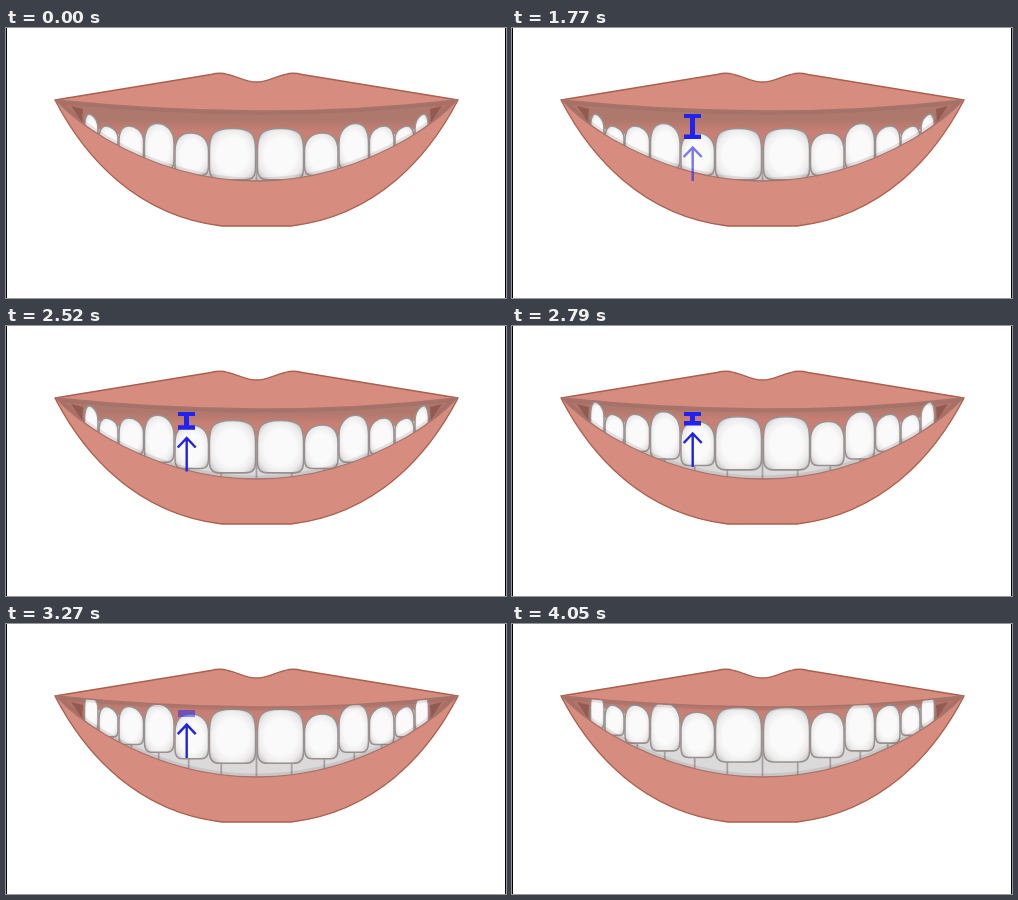
An HTML page for the animation above (6.3 s loop, 500 px wide and 270 px high).

```html
<!DOCTYPE html>
<html lang="en">
<head>
<meta charset="utf-8">
<title>Smile</title>
<style>
  html, body { margin: 0; width: 100%; height: 100%; overflow: hidden; background: #fff; }
  svg { display: block; width: 100%; height: 100%; }
</style>
</head>
<body>
<svg viewBox="0 0 500 270">
  <defs>
    <clipPath id="mouth">
      <path id="opening" d="M50 72Q150 82.5 250.5 83T451 72Q433 92 401 111C361 134 311 153 250.5 153S140 134 100 111Q68 92 50 72Z"/>
    </clipPath>
    <linearGradient id="gum" gradientUnits="userSpaceOnUse" x1="0" y1="92" x2="0" y2="104">
      <stop stop-color="#ae786d"/><stop offset="1" stop-color="#c97f74"/>
    </linearGradient>
    <radialGradient id="enamel" cx=".5" cy=".52" r=".62">
      <stop offset=".55" stop-color="#fafafa"/><stop offset=".8" stop-color="#ebebeb"/><stop offset="1" stop-color="#c8c5c5"/>
    </radialGradient>
  </defs>

  <path fill="#d78c80" stroke="#a9604f" stroke-width="1.3" stroke-linejoin="round"
    d="M49 72L205 46.5Q214 44 222 46.5C233 49 240 54 250.5 54S268 49 279 46.5Q287 44 296 46.5L452 72C423 128 371 188 285 198H216C130 188 78 128 49 72Z"/>

  <g clip-path="url(#mouth)">
    <path fill="#dadada" d="M40 60H460V160H40Z"/>
    <path id="lower" stroke="#a5a1a0" stroke-width="1.8"/>
    <g id="jaw">
      <path fill="url(#gum)" d="M40 40H461V80L431 95Q250.5 149 70 95L40 80Z"/>
      <g id="teeth" fill="url(#enamel)" stroke="#99908e" stroke-width="1.5"/>
    </g>
    <path fill="#b3746a" d="M48 70L78 78V100ZM453 70L423 78V100Z"/>
    <path fill="#7d4b41" opacity=".6" d="M65 78L77 81L76 94ZM436 78L424 81L425 94Z"/>
    <use href="#opening" fill="none" stroke="#6b5552" stroke-width="7" opacity=".15"/>
  </g>
  <use href="#opening" fill="none" stroke="#a8736a" stroke-width="1.4"/>

  <path id="gauge" fill="#2222f0"/>
  <path id="arrow" fill="none" stroke="#2222e0" stroke-width="2.4" d="M180.7 153V120M171.7 129L180.7 119.5L189.7 129"/>
  <path d="M.5 0V270M499.5 0V270" stroke="#000"/>
</svg>
<script>
const el = id => document.getElementById(id);
const ramp = (t, from, to) => Math.min(1, Math.max(0, (t - from) / (to - from)));
const ease = p => p * p * (3 - 2 * p);
const MID = 250.5;

function crown(l, r, top, i) {
  const w = r - l, d = MID - (l + r) / 2;
  const b = 152.5 - d * d / 850, h = b - top;
  const peak = l + w * (.5 - .035 * i);  // outer teeth lean outwards
  const k = w * (i ? .18 : .06), side = top + h * .42, bend = top + h * .12;
  return `M${l + w * .22} ${b}Q${l} ${b} ${l} ${b - h * .2}L${l} ${side}` +
    `C${l} ${bend} ${l + k} ${top} ${peak} ${top}S${r} ${bend} ${r} ${side}` +
    `L${r} ${b - h * .2}Q${r} ${b} ${r - w * .22} ${b}Z`;
}

// Half an arch from the centre outwards, then its mirror image
const widths = [46, 33.5, 29.5, 24.5, 19, 13.5];
const tops = [100.5, 105, 95.5, 98, 98, 86];
let right = MID - 1;
const half = widths.map((w, i) => {
  const path = `<path d="${crown(right - w, right, tops[i], i)}"/>`;
  right -= w + 1;
  return path;
}).join("");
el("teeth").innerHTML = half + `<g transform="matrix(-1 0 0 1 ${2 * MID} 0)">${half}</g>`;

let gaps = "";
for (let n = -4; n <= 4; n++) gaps += `M${MID + n * (36.5 - 1.3 * Math.abs(n))} 100v55`;
el("lower").setAttribute("d", gaps);

function draw(now) {
  const t = Math.floor(now % 6300 / 30) * 30;
  const p = ease(ramp(t, 1770, 3630));
  const stretch = 1 + .06 * p;
  el("jaw").setAttribute("transform", `translate(0 ${100 - 17 * p - 100 * stretch}) scale(1 ${stretch})`);

  const low = 111 - 20 * p;
  el("gauge").setAttribute("d",
    `M172 86H189V90H183V${low - 4.5}H189V${low}H172V${low - 4.5}H178V90H172Z`);
  el("gauge").setAttribute("opacity", ramp(t, 900, 1350) * (1 - ramp(t, 3060, 3480)));

  el("arrow").setAttribute("transform", `translate(0 ${-21 * p})`);
  el("arrow").setAttribute("opacity", ramp(t, 1500, 1950) * (1 - ramp(t, 3750, 4050)));
}

const start = performance.now();
function tick() {
  draw(performance.now() - start);
  requestAnimationFrame(tick);
}
tick();
</script>
</body>
</html>
```
